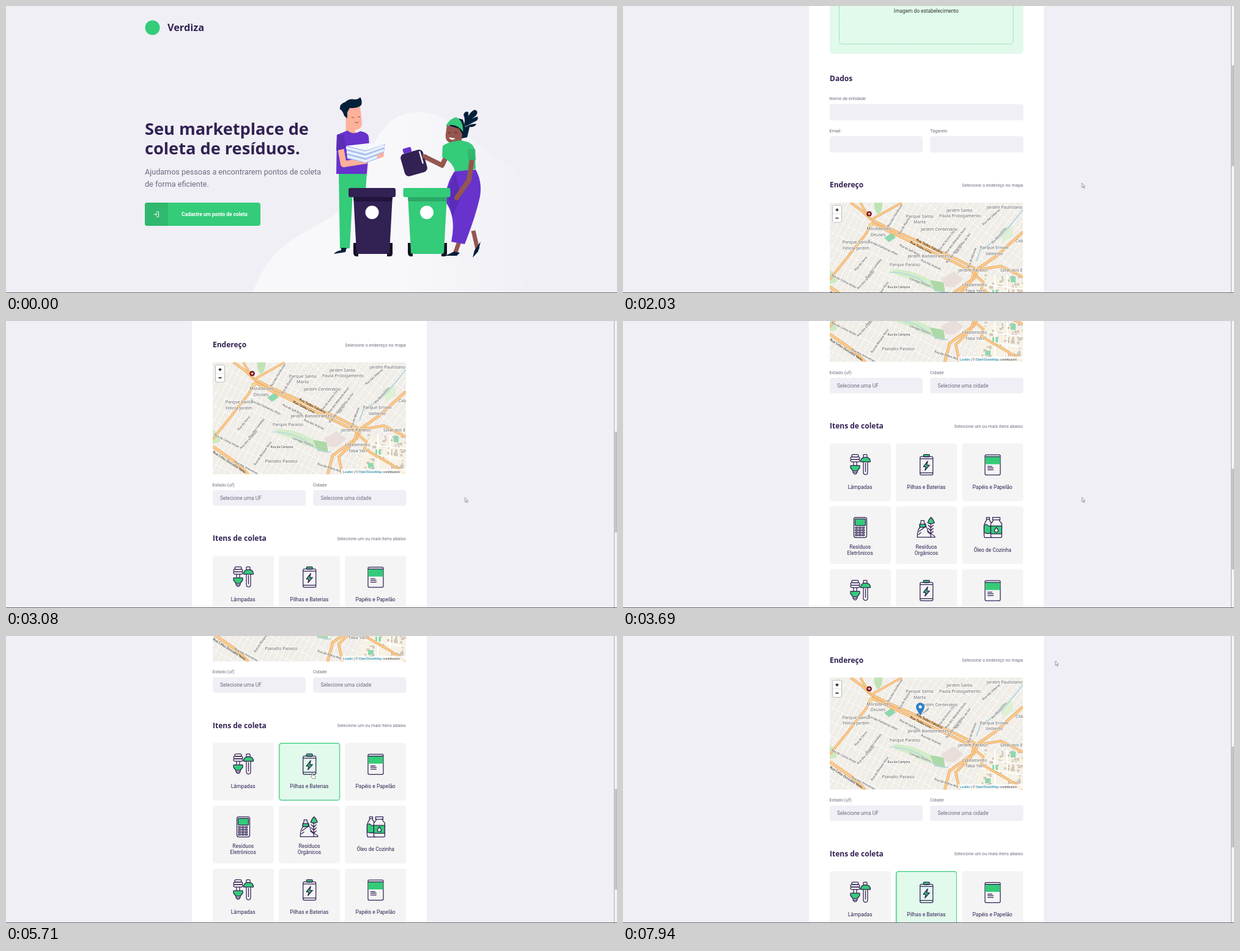
Write an HTML page that moves like this. It is 999 by 470 pixels and loops after 8 s.

```html
<!DOCTYPE html>
<html lang="pt-BR">
<head>
<meta charset="utf-8">
<title>Ponto de coleta</title>
<style>
html, body { margin: 0; width: 100%; height: 100%; overflow: hidden; background: #f0eff5; }
svg#stage { display: block; width: 999px; height: 470px; }
text { font-family: Roboto, sans-serif; font-size: 7.3px; fill: #6c6c80; }
.h { font-family: "Open Sans", sans-serif; font-weight: 700; fill: #322153; }
.h1 { font-size: 27.2px; } .h2 { font-size: 18px; } .h3 { font-size: 12px; } .brand { font-size: 16.3px; }
.lead { font-size: 12.6px; }
.btn { font-size: 8.35px; font-weight: 700; fill: #fff; }
.mid { text-anchor: middle; } .end { text-anchor: end; }
.opt { font-size: 8.5px; }
.dark { fill: #322153; font-size: 8.5px; }
.field { fill: #f0eff5; }
.place { font: 7.1px "Noto Sans", sans-serif; fill: #666; text-anchor: middle; stroke: #fff; stroke-width: 1.4px; stroke-opacity: .75; paint-order: stroke; }
.street { font: 4.8px "Noto Sans", sans-serif; fill: #333; text-anchor: middle; stroke: #fff; stroke-width: .8px; paint-order: stroke; }
.avenue { font: 5.4px "Noto Sans", sans-serif; fill: #111; text-anchor: middle; }
.credit { font: 5.35px "Liberation Sans", sans-serif; fill: #333; }
.credit tspan { fill: #0078a8; }
.icon { fill: none; stroke: #322153; stroke-width: 1.25; stroke-linejoin: round; stroke-linecap: round; }
.icon .g { fill: #34cb79; }
.icon .w { fill: #f5f5f5; }

.home, .form, .page, .thumb, .bar, .arrow, .hand, .cursor, .pin, .pick { animation: 8s step-end infinite; }
.home { animation-name: leave; }
.form { animation-name: enter; }
.page { --k: -1; animation-name: scroll; animation-timing-function: ease-in-out; }
.thumb { --k: .33; animation-name: scroll; animation-timing-function: ease-in-out; }
.bar { animation-name: shrink; }
.cursor { animation-name: move; animation-timing-function: ease-in-out; }
.arrow { animation-name: arrow; }
.hand { animation-name: hand; }
.pin { animation-name: pin; }
.pick.oil { animation-name: oil; }
.pick.cell { animation-name: cell; }

@keyframes leave { 0% { opacity: 1 } 12.3%, 100% { opacity: 0 } }
@keyframes enter { 0% { opacity: 0 } 12.3%, 100% { opacity: 1 } }
@keyframes shrink { 0% { height: 228px } 16.5%, 100% { height: 165px } }
@keyframes oil { 0% { opacity: 0 } 55.5%, 100% { opacity: 1 } }
@keyframes cell { 0% { opacity: 0 } 71.2%, 100% { opacity: 1 } }
@keyframes pin { 0% { opacity: 0 } 87.5%, 100% { opacity: 1 } }
@keyframes arrow { 0%, 12.3%, 57.2%, 73%, 90% { opacity: 1 } 9%, 53%, 68%, 75.5% { opacity: 0 } 100% { opacity: 1 } }
@keyframes hand { 0%, 12.3%, 57.2%, 73%, 90% { opacity: 0 } 9%, 53%, 68%, 75.5% { opacity: 1 } 100% { opacity: 0 } }
@keyframes scroll {
  0%, 19.4% { transform: translateY(0) }
  27.5%, 32.5% { transform: translateY(calc(var(--k) * 315px)) }
  38.5%, 41% { transform: translateY(calc(var(--k) * 525px)) }
  45.6%, 46.8% { transform: translateY(calc(var(--k) * 709px)) }
  50.5%, 63% { transform: translateY(calc(var(--k) * 944.5px)) }
  69%, 73% { transform: translateY(calc(var(--k) * 734.5px)) }
  78%, 100% { transform: translateY(calc(var(--k) * 524.5px)) }
}
@keyframes move {
  0% { transform: translate(820px, 482px) }
  1.6% { transform: translate(820px, 470px) }
  9.5%, 16.5% { transform: translate(395px, 351px) }
  23%, 32% { transform: translate(750.5px, 290px) }
  40%, 50% { transform: translate(750.5px, 289px) }
  54.5%, 56% { transform: translate(610px, 315px) }
  60%, 63.5% { transform: translate(689px, 297px) }
  69%, 72% { transform: translate(500px, 225px) }
  78%, 81.5% { transform: translate(557px, 196px) }
  86.5%, 88.5% { transform: translate(486px, 131px) }
  93.5%, 100% { transform: translate(707px, 41px) }
}
</style>
</head>
<body>
<svg id="stage" viewBox="0 0 999 470">
  <defs>
    <linearGradient id="hill"><stop offset=".5" stop-color="#f8f8fb"/><stop offset="1" stop-color="#f0eff5"/></linearGradient>
    <clipPath id="mapClip"><rect width="316" height="183.5"/></clipPath>
    <pattern id="blocksA" width="9" height="21" patternUnits="userSpaceOnUse" patternTransform="rotate(27)">
      <path d="M0 0H9M0 0V21" stroke="#dcd8d2" stroke-width="3.6"/><path d="M0 0H9M0 0V21" stroke="#fff" stroke-width="2.6"/>
    </pattern>
    <pattern id="blocksB" width="19" height="9" patternUnits="userSpaceOnUse" patternTransform="rotate(-53)">
      <path d="M0 0H19M0 0V9" stroke="#dcd8d2" stroke-width="3.4"/><path d="M0 0H19M0 0V9" stroke="#fff" stroke-width="2.4"/>
    </pattern>
  </defs>
  <rect width="999" height="470" fill="#f0eff5"/>

  <g class="home">
    <path fill="url(#hill)" d="M403 470C415 440 430 405 480 375C540 340 575 330 590 260C605 205 630 174 672 174C730 174 750 215 790 240C840 270 870 300 872 360C873 410 850 445 840 470Z"/>
    <circle cx="239.5" cy="35.5" r="12" fill="#34cb79"/>
    <text class="h brand" x="264" y="41">Verdiza</text>
    <text class="h h1" x="227" y="210.5">Seu marketplace de</text>
    <text class="h h1" x="227" y="243">coleta de resíduos.</text>
    <text class="lead" x="227" y="275.5">Ajudamos pessoas a encontrarem pontos de coleta</text>
    <text class="lead" x="227" y="295.5">de forma eficiente.</text>
    <rect x="227" y="322" width="189" height="38" rx="4" fill="#34cb79"/>
    <path d="M231 322H265V360H231Q227 360 227 356V326Q227 322 231 322Z" fill="#2fb86e"/>
    <path d="M246 337H249.5V345.5H246M241.5 341.2H247M244.8 339L247 341.2L244.8 343.4" fill="none" stroke="#fff"/>
    <text class="btn" x="287" y="344">Cadastre um ponto de coleta</text>

    <!-- man -->
    <path fill="#34cb79" d="M544 274H590L588 302H567L562 397H546Z"/>
    <path fill="#03203a" d="M548 396H557L555 403L536 406Q540 401 548 400Z"/>
    <path fill="#fdb09a" d="M555 166L579 164L582 191Q582 202 571 203L572 209H556Z"/>
    <path fill="#03203a" d="M546 169Q545 160 555 157Q561 151 570 153Q577 153 579 149Q583 155 581 162Q576 168 562 167L558 174L558 184L553 180Q551 172 546 169Z"/>
    <path fill="none" stroke="#8a4b45" d="M565 182q2 2 4 0M575 181q2 2 4 0M570 190q4 3 7-1"/>
    <path fill="#6733cc" d="M541 211L558 204Q569 212 579 205Q592 207 593 214L594 228L590 275H540Z"/>
    <path fill="none" stroke="#fdb09a" stroke-width="10" stroke-linejoin="round" d="M547 232L552 259L590 253"/>
    <path fill="#5a2cb8" d="M541 211H552L556 233L540 237Z"/>
    <path fill="#f4f7fe" d="M556 229L588 237L620 226L600 224Z"/>
    <path fill="#a9c1ee" d="M556 229L588 237L620 226L617 247L588 257L558 250Z"/>
    <path fill="none" stroke="#eaf1fd" stroke-width="3.6" d="M556 232L588 240L619 229M557 239L588 247L618 236M558 246L588 254L617 243"/>
    <path fill="#fdb09a" d="M606 245L618 239L617 247L608 250Z"/>

    <!-- woman -->
    <path fill="none" stroke="#96564e" stroke-width="7" d="M741 386L734 406M764 368L771 398"/>
    <path fill="#03203a" d="M718 409L733 402L742 404L737 409ZM776 386L772 402L763 412L766 400Z"/>
    <path fill="#6733cc" d="M734 270L768 268Q779 288 775 312Q768 344 750 390L728 386Q737 345 718 320Q719 290 734 270Z"/>
    <path fill="#5a2cb8" d="M722 306L730 345L744 312L734 272Z"/>
    <path fill="#03203a" d="M748 198Q752 186 748 178Q751 171 756 174Q757 185 748 198Z"/>
    <path fill="#03203a" d="M749 198Q755 175 766 170Q774 172 768 180Q758 187 749 198ZM750 198Q757 184 771 181Q773 187 767 189ZM750 199Q759 192 769 193Q767 199 758 198L754 215L744 217Q740 193 750 199Z"/>
    <path fill="#03203a" d="M723 194Q732 180 747 186L753 205L746 217Z"/>
    <path fill="#96564e" d="M721 195L741 201L746 210L744 226H727L727 224Q717 222 719 209Z"/>
    <path fill="#34cb79" d="M719 197Q724 185 736 182Q749 189 747 206Q743 199 735 196Q726 193 719 197Z"/>
    <path fill="none" stroke="#4a2430" d="M723 208q3-2 4 0M733 208q3-2 5 0"/>
    <path fill="#fff" d="M724 215L735 217Q728 222 724 215Z"/>
    <path fill="none" stroke="#96564e" stroke-width="8" stroke-linejoin="round" d="M722 242L713 261L683 246"/>
    <path fill="#34cb79" d="M714 229Q723 222 742 220Q764 222 766 235L768 267L734 271Q731 256 713 247Z"/>

    <g transform="rotate(-16 667 257)">
      <rect x="648" y="238" width="38" height="38" rx="7" fill="#322153"/>
      <rect x="655" y="230" width="14" height="8" rx="2" fill="#6733cc"/>
      <path d="M681 242V261" stroke="#f4f3f8" stroke-width="2.5" stroke-linecap="round"/>
    </g>
    <path fill="#96564e" d="M681 242L690 245L688 251L681 249Z"/>

    <!-- bins -->
    <path fill="#161226" d="M568 388h8v22h-4q-4-1-4-6zM623 388h9v17q0 5-4 5h-5z"/>
    <path fill="#322153" d="M568 310H632L627 403Q627 406 623 406H577Q573 406 573 403Z"/>
    <path fill="#21143c" d="M568 312H632L631 320H569Z"/>
    <rect x="560" y="298" width="77" height="15" rx="3" fill="#322153"/>
    <path fill="#161226" d="M657 388h8v22h-4q-4-1-4-6zM712 388h9v17q0 5-4 5h-5z"/>
    <path fill="#34cb79" d="M657 310H721L716 403Q716 406 712 406H666Q662 406 662 403Z"/>
    <path fill="#2ba866" d="M657 312H721L720 320H658Z"/>
    <rect x="649.5" y="298" width="77" height="15" rx="3" fill="#34cb79"/>
    <circle cx="598.5" cy="338" r="11" fill="#fff"/><circle cx="688" cy="338" r="11" fill="#fff"/>
    <path fill="none" stroke="#96564e" stroke-width="8" stroke-linejoin="round" stroke-linecap="round" d="M762 250L757 285L737 314"/>
    <path fill="#2fb86e" d="M755 234L767 234L768 253L755 251Z"/>
  </g>

  <g class="form">
    <g class="page">
      <circle cx="219.5" cy="35.5" r="12.5" fill="#34cb79"/>
      <text class="h brand" x="244" y="41">Verdiza</text>
      <path d="M710 35H704.5M707 32.5L704.5 35L707 37.5" fill="none" stroke="#34cb79"/>
      <text x="720" y="38.3" style="font-size:8.4px;font-weight:500;fill:#322153">Voltar para home</text>
      <rect x="304" y="89" width="384" height="1307.5" rx="4.5" fill="#fff"/>
      <text class="h h2" x="338" y="139.5">Cadastro do</text>
      <text class="h h2" x="338" y="162">ponto de coleta</text>

      <rect x="338" y="191.5" width="316.5" height="157.5" rx="5" fill="#e1faec"/>
      <rect x="353.5" y="207.5" width="284.5" height="125.5" rx="5" fill="none" stroke="#4ecb79" stroke-width=".8" stroke-dasharray="2 1.5"/>
      <path d="M491 265V267.5Q491 268.8 492.3 268.8H499.7Q501 268.8 501 267.5V265M496 266V259M493.2 261.6L496 258.8L498.8 261.6" fill="none" stroke="#34cb79" stroke-width="1.2"/>
      <text class="mid" x="495.8" y="281.8" style="font-size:8.35px;fill:#333">Imagem do estabelecimento</text>

      <text class="h h3" x="338" y="393.7">Dados</text>
      <text x="337.5" y="424.8">Nome da entidade</text>
      <rect class="field" x="338" y="431.5" width="316.5" height="26.5" rx="4"/>
      <text x="337.5" y="477.5">Email</text>
      <text x="502" y="477.5">Tagarelo</text>
      <rect class="field" x="338" y="484" width="152" height="26.5" rx="4"/>
      <rect class="field" x="502" y="484" width="152.5" height="26.5" rx="4"/>

      <text class="h h3" x="338" y="568">Endereço</text>
      <text class="end" x="654" y="566.7">Selecione o endereço no mapa</text>
      <g id="map" transform="translate(338 592.5)" clip-path="url(#mapClip)"></g>

      <text x="337.5" y="795.7">Estado (uf)</text>
      <text x="502" y="795.7">Cidade</text>
      <rect class="field" x="338" y="802" width="152" height="25.5" rx="4"/>
      <rect class="field" x="502" y="802" width="152.5" height="25.5" rx="4"/>
      <text class="opt" x="350" y="817.7">Selecione uma UF</text>
      <text class="opt" x="514.5" y="817.7">Selecione uma cidade</text>

      <text class="h h3" x="338" y="885">Itens de coleta</text>
      <text class="end" x="654" y="883.7">Selecione um ou mais itens abaixo</text>
      <g id="tiles"></g>
      <rect x="517" y="1333.5" width="137.5" height="30" rx="4" fill="#34cb79"/>
      <text class="btn mid" x="585.7" y="1351.5">Cadastrar ponto de coleta</text>
    </g>
    <rect x="994.5" width="4.5" height="470" fill="#f3f3f6"/>
    <rect x="994" width="1" height="470" fill="#a9a9b0"/>
    <g class="thumb"><rect class="bar" x="995.5" y="8" width="3.5" height="165" fill="#bfbfc3"/></g>
  </g>

  <rect y="469" width="999" height="1" fill="#66666c"/>
  <g class="cursor" fill="#fff" stroke="#555" stroke-width=".6">
    <path class="arrow" d="M0 0V7.2L1.7 5.7L2.9 8.4L4 7.9L2.9 5.3H5Z"/>
    <path class="hand" d="M0 0Q1-.8 1.8 0V3L5 3.6Q6 4 6 5L5.4 8.5H1L-1.5 5Q-1 4 0 5Z"/>
  </g>
</svg>

<script>
const at = (x, y, body) => `<g transform="translate(${x} ${y})">${body}</g>`;
const label = (cls, [text, x, y, angle = 0]) =>
  `<text class="${cls}" transform="translate(${x} ${y}) rotate(${angle})">${text}</text>`;

// Map: 316 x 183.5
const area = (d, fill) => `<path d="${d}" fill="${fill}"/>`;
const line = (d, color, w) => `<path d="${d}" fill="none" stroke="${color}" stroke-width="${w}"/>`;
const road = (d, w) => line(d, "#d9964a", w + 1) + line(d, "#fcc98a", w);

const places = [
  ["Jardim Paulistano", 286, 10], ["Jardim Santa", 212, 15], ["Paula Prologamento", 213, 24.5],
  ["Parque Santa", 147, 25], ["Marta", 147, 34.5], ["Jardim Centenário", 179, 46.5],
  ["Morada dos", 80, 45.5], ["Deuses", 79, 55], ["Parque Santa", 43, 67.5], ["Felícia Jardim", 43, 77],
  ["Jardim Bandeirantes", 161, 90], ["Parque Paraíso", 123, 104.5], ["Planalto Paraíso", 112, 164.5],
  ["Jardim Paraíso", 234, 113], ["Parque Ernani", 269, 76.5], ["Valberto", 269, 86], ["Solar dos E", 297, 113],
  ["Cida", 311, 65.5], ["Loteamento", 237, 137.5], ["Taba Yaci", 237, 147]
];
const streets = [
  ["Rua das Palmeiras Altas", 86, 75, 25], ["Rua do Ipê Roxo", 130, 79, 27], ["Rua das Acácias", 165, 103, 25],
  ["Rua da Colina Verde", 22, 130, 27], ["Rua dos Girassóis", 60, 128, -47], ["Rua das Camélias", 73, 109, -52],
  ["Rua da Serra", 52, 101, -50], ["Rua do Bosque Novo", 83, 150, -55], ["Rua da Campina", 113, 140, 0],
  ["Rua das Hortênsias", 108, 22, -58], ["Rua do Riacho", 123, 39, -58], ["Rua da Aurora Clara", 193, 62, -52],
  ["Rua dos Manacás Azuis", 207, 63, -52], ["Rua do Pôr do Sol", 219, 68, -55], ["Rua das Magnólias", 205, 83, -52],
  ["Rua do Mirante", 234, 91, -70], ["Rua das Videiras", 265, 25, -42], ["Rua da Pedra Alta", 190, 174, 18],
  ["Rua das Amoreiras", 54, 174, 28], ["Rua do Vale", 252, 178, -12]
];
const avenues = [
  ["Rua Tadeu Falverni", 162, 73, 28], ["Rua Tadeu Lino", 148, 75, 28], ["Rua Celso Dorvalini Neto", 26, 165, 33]
];

// Small buildings scattered over the lower right quarter
let seed = 7;
const rnd = () => (seed = seed * 16807 % 2147483647) / 2147483647;
const houses = Array.from({ length: 60 }, () =>
  `<rect x="${248 + rnd() * 66}" y="${118 + rnd() * 58}" width="${2 + rnd() * 4}" height="${2 + rnd() * 3}" fill="#d3c5b7"/>`).join("");

const east = "M150 0H316V184H240L230 112L170 68Z";
document.getElementById("map").innerHTML =
  `<rect width="316" height="184" fill="#f1eee8"/>` +
  `<rect width="316" height="184" fill="url(#blocksA)"/>` +
  area(east, "#f1eee8") + area(east, "url(#blocksB)") +
  area("M245 120L316 130V184H240Z", "#f6f2e6") + houses +
  area("M73 0H86Q87 14 80 19Q72 17 73 0Z", "#bfe3b4") +
  area("M89 58L101 50L108 57L97 65Z", "#8fd8ae") +
  area("M0 110L8 116L12 130L0 134Z", "#cdeabf") +
  area("M102 110Q130 107 165 127L168 141Q150 138 135 127L106 117Z", "#d3edc8") +
  area("M164 127L186 131L189 148L171 145Z", "#add8a7") +
  area("M182 125L203 113L219 126L202 139L190 138Z", "#e9deda") +
  area("M266 143h9v12h-9zM296 121h8v10h-8zM254 165h9v8h-9z", "#8fd8ae") +
  area("M277 45L297 37L300 55L283 65Z", "#dff0d4") +
  line("M316 12Q298 35 284 50T246 78L240 96", "#b2d6e0", 2) +
  line("M98 114Q135 115 158 133T194 146", "#b2d6e0", 1.6) +
  line("M270 118V184M248 148L316 160M260 135L316 142M290 118V184", "#fff", 2) +
  road("M0 126L32 86L60 50L66 36", 3) +
  road("M34 0L52 13L68 28L92 40L150 66L206 92L238 108", 3.2) +
  road("M68 33L92 45L148 72L204 98L236 114", 3.2) +
  road("M50 0L66 27M68 28L118 0", 2.6) +
  road("M0 138L40 166L58 184", 4) +
  road("M316 48L272 88L243 108L236 124L196 153L188 184", 3.6) +
  road("M238 108L230 132L206 155L212 184M243 110L280 104L316 122", 3.2) +
  road("M238 119L251 130L248 142L290 166L316 184", 3) +
  `<circle cx="67" cy="37" r="3.2" fill="#cdeabf" stroke="#fcc98a" stroke-width="2"/>` +
  streets.map(s => label("street", s)).join("") +
  avenues.map(s => label("avenue", s)).join("") +
  label("street", ["Córrego Paraíso", 147, 132, 20]) +
  label("street", ["Rio Monjolinho", 278, 55, -48]) +
  places.map(p => label("place", p)).join("") +
  `<circle cx="64.5" cy="18.5" r="3.8" fill="#b3121f" stroke="#2b0f20" stroke-width="1"/>` +
  line("M62.5 18.5H66.5M64.5 16.5V20.5", "#fff", 1) +
  `<rect x="4.5" y="4.5" width="15" height="28" rx="2" fill="#fff" stroke="#bbb" stroke-width="1"/>` +
  line("M5 18.5H19", "#ccc", .6) +
  line("M9.5 12H14.5M12 9.5V14.5M9.5 25.5H14.5", "#000", 1.3) +
  `<rect x="210" y="174.5" width="106" height="9" fill="#fff" opacity=".75"/>` +
  `<text class="credit" x="213" y="181"><tspan>Leaflet</tspan> | © <tspan>OpenStreetMap</tspan> contributors</text>` +
  `<g class="pin"><path d="M148 62L160 50Q164 47 161 54Z" fill="#000" opacity=".25"/>` +
  `<path d="M148 62L143 53Q141.5 50.5 141.5 48A6.5 6.5 0 0 1 154.5 48Q154.5 50.5 153 53Z" fill="#2a81cb" stroke="#2368a5" stroke-width=".6"/>` +
  `<circle cx="148" cy="48" r="2.5" fill="#fff"/></g>`;

// Collection items, icons in a 36 x 35 box
const keys = [17, 21, 25, 29].map(y =>
  [10, 15.5, 21].map(x => `<rect x="${x}" y="${y}" width="3.6" height="2.2" rx=".5"/>`).join("")).join("");
const items = [
  [["Lâmpadas"], `<rect x="4" y="1" width="11" height="4" rx="2"/><rect x="2" y="5" width="15" height="4" rx="2"/><rect x="2" y="9" width="15" height="4" rx="2"/>
    <path d="M7 13V19M12 13V19"/><path class="g" d="M2 19H17V23L13 28H6L2 23Z"/><path d="M6 28V30L8 33H11L13 30V28M6 30.5H13"/>
    <rect x="23" y="1" width="6" height="5" rx="1"/><path d="M23 12V30Q23 34 26.5 34T30 30V12M26.5 15V29"/><path class="g" d="M18.5 13Q18.5 5.5 26.5 5.5T34.5 13Z"/>`],
  [["Pilhas e Baterias"], `<rect class="g" x="13" y="1" width="10" height="4" rx="1.5"/><rect x="7.5" y="4.5" width="21" height="30" rx="2"/>
    <path d="M8 8H28M8 31H28"/><path class="g" d="M20 12L13 21H17L15.5 27L23 18.5H18.5Z"/>`],
  [["Papéis e Papelão"], `<rect x="5.5" y="1.5" width="25" height="33" rx="2"/><path d="M6 4.5H30V17H6Z" fill="#34cb79" stroke="none"/><path d="M6 4.5H30M10 20.5H17M10 23.2H19M10 26H19"/>`],
  [["Resíduos", "Eletrônicos"], `<rect x="7.5" y="1" width="21" height="33" rx="3"/><rect class="g" x="9.5" y="3.5" width="17" height="11" rx="1"/>${keys}`],
  [["Resíduos", "Orgânicos"], `<path d="M3 33.5Q3 20 9 16L13 14Q20 15 20 25L24 28Q31 30 32 33.5Z"/><path class="w" d="M9 6H14V9L17 13V17H7V13L9 9Z"/>
    <path class="g" d="M7 12H16V17H7Z"/><path d="M6 24L14 18M5 29L9 26M25 12V33M21 14L25 18L29 14M21 19L25 23L29 19M21 24L25 28L29 24"/><path class="g" d="M20 10Q22 4 25.5 1Q29 4 31 10Q25 13 20 10Z"/>`],
  [["Óleo de Cozinha"], `<path class="w" d="M8 1H13V6Q17 11 17 16V34H5Q4 33 4 30V16Q4 11 8 6Z"/><path class="g" d="M4 14Q8 11 10 14T17 14V26Q11 29 4 26Z"/>
    <path d="M8 4H13"/><path class="w" d="M18 1H30V5H29Q29 8 33 11V32Q33 34 31 34H17Q15 34 15 32V11Q19 8 19 5H18Z"/><path d="M18 5H30"/>
    <path class="g" d="M15 15H33V28H15Z"/><path d="M24 17.5Q30 25 24 25.5Q18 25 24 17.5Z" fill="#fff"/>`]
];
const picked = { 1: "cell", 11: "oil" };

function tile(_, i) {
  const [names, icon] = items[i % 6];
  const x = 338 + i % 3 * 108.2, y = 909.5 + Math.floor(i / 3) * 103;
  const first = names.length > 1 ? 69 : 74;
  const frame = picked[i]
    ? `<rect class="pick ${picked[i]}" x=".6" y=".6" width="98.8" height="93.3" rx="4" fill="#e1faec" stroke="#34cb79" stroke-width="1.2"/>` : "";
  return at(x, y, `<rect width="100" height="94.5" rx="4" fill="#f4f4f4"/>${frame}` +
    at(32, 17, `<g class="icon">${icon}</g>`) +
    names.map((n, k) => `<text class="dark mid" x="49.7" y="${first + k * 10}">${n}</text>`).join(""));
}
document.getElementById("tiles").innerHTML = Array.from({ length: 12 }, tile).join("");
</script>
</body>
</html>
```
